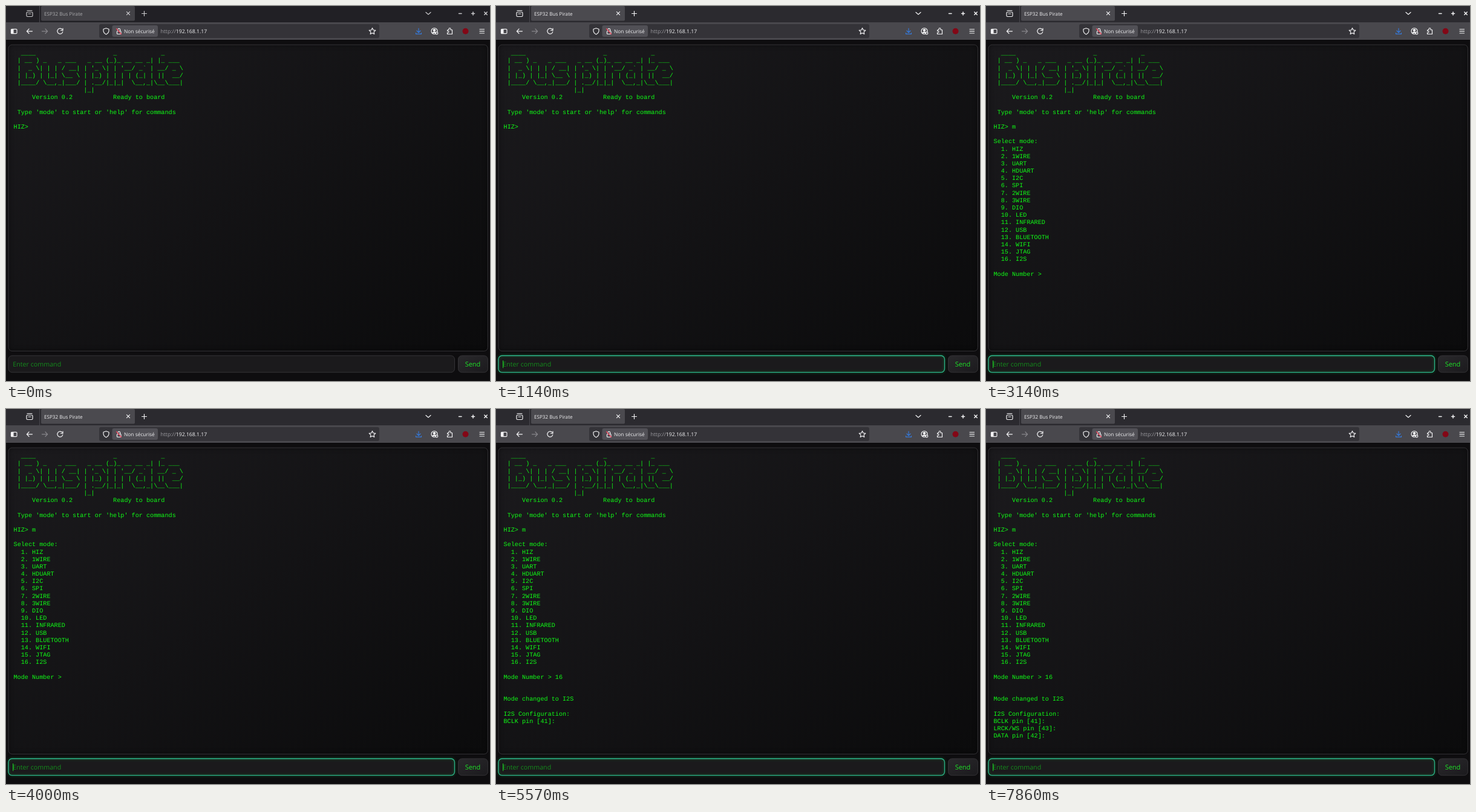
Animation, 800 px wide and 621 px high, one loop 8000 ms. Source, as an HTML page:

```html
<!DOCTYPE html>
<html lang="en">
<head>
<meta charset="utf-8">
<title>ESP32 Bus Pirate</title>
<style>
html, body { margin: 0; width: 100%; height: 100%; overflow: hidden; background: #0e0d0f; }
#panel {
  position: absolute; left: 4px; top: 64px; width: 792px; height: 507px; border-radius: 6px;
  background: linear-gradient(145deg, #1b1a1d, #0b0b0c);
  box-shadow: inset 0 0 8px #0007;
}
svg { position: absolute; left: 0; top: 0; }
text { font-family: "Open Sans", "Noto Sans", sans-serif; text-rendering: geometricPrecision; white-space: pre; }
#term text { font: 10.16px "Liberation Mono", monospace; fill: #10fc16; }
.ui { font-size: 8.15px; fill: #f0f0f2; }
.icon { fill: none; stroke: #f2f2f4; stroke-width: 1.2; stroke-linecap: round; stroke-linejoin: round; }
.frame { fill: none; stroke: #343336; }
.green { font-size: 11px; fill: #1fe428; }
#focus { fill: none; stroke: #2bb48a; stroke-width: 1.3; filter: drop-shadow(0 0 2px #14c84688); }
</style>
</head>
<body>
<div id="panel"></div>
<svg width="800" height="621" viewBox="0 0 800 621">
  <linearGradient id="button" x2="1" y2="1"><stop stop-color="#2a292c"/><stop offset="1" stop-color="#1b1a1d"/></linearGradient>

  <rect id="tabbar" width="800" height="28"/>
  <path d="M55.5 0V27" stroke="#48474d"/>
  <rect id="tab" x="58" y="0" width="155" height="24.5" rx="2"/>
  <rect y="27" width="800" height="29" fill="#49484d"/>
  <rect y="56" width="800" height="1" fill="#09080a"/>
  <rect x="154" y="30" width="463" height="23" rx="3" fill="#343338"/>
  <rect x="175.500" y="32" width="75.500" height="19" rx="3" fill="#515056"/>

  <g id="tabIcons" class="icon">
    <rect x="34" y="10" width="10" height="7.500" rx="1.500"/>
    <path d="M35 7.500H43M37 13H41"/>
    <path d="M199.500 9.700L204.500 14.700M204.500 9.700L199.500 14.700M224.500 12.500H232.500M228.500 8.500V16.500M694 10.500L698 14L702 10.500"/>
    <path d="M748.500 12.500H753M769.500 12.500H774.500M772 10V15M790.800 10L795.200 14.500M795.200 10L790.800 14.500" stroke-width="1.500"/>
  </g>
  <text id="tabTitle" class="ui" x="63" y="15.500">ESP32 Bus Pirate</text>

  <g class="icon">
    <rect x="8.500" y="38.300" width="9.500" height="7.400" rx="1.200"/>
    <path d="M9 39H12V45H9Z" fill="#f2f2f4"/>
    <path d="M43.500 41.800H34.500M38 38L34.300 41.800L38 45.500"/>
    <path d="M59.500 41.800H68.500M65 38L68.700 41.800L65 45.500" stroke="#88878c"/>
    <path d="M93 39A4.500 4.500 0 1 0 93.800 42.500M94 37V40.500H90.500"/>
    <path d="M165.500 36.800L170 38.300V41.500Q169.500 45 165.500 47Q161.500 45 161 41.500V38.300Z"/>
    <rect x="183.500" y="41.500" width="6.500" height="5" rx="1"/>
    <path d="M184.800 41V39A2 2 0 0 1 188.700 39V41"/>
    <path d="M182.500 37.500L190.500 46.500" stroke="#f04058"/>
    <path id="star"/>
    <path d="M682 37V43.500M679 41L682 44L685 41M677.500 44.500V46.300H686.500V44.500" stroke="#3578d8"/>
    <circle cx="708" cy="41.500" r="5"/>
    <circle cx="708" cy="40" r="1.700" fill="#f2f2f4"/>
    <path d="M705 44.500Q708 41.500 711 44.500Z" fill="#f2f2f4"/>
    <circle cx="712" cy="45" r="1.800" fill="#49484d"/>
    <path d="M730 39.500H732V38A1.500 1.500 0 0 1 735 38V39.500H737.500V46.500H729.500V44H731A1.300 1.300 0 0 0 731 41.500H729.500Z"/>
    <path d="M783 38.500H790.500M783 41.700H790.500M783 45H790.500"/>
  </g>
  <circle cx="759.500" cy="41.700" r="5" fill="#830716"/>
  <text class="ui" x="195" y="45" style="font-size:8.4px">Non sécurisé</text>
  <text class="ui" x="255.500" y="45" style="font-size:8.65px"><tspan fill="#9d9ca2">http://</tspan>192.168.1.17</text>

  <rect class="frame" x="4" y="64.200" width="792.300" height="507.200" rx="6"/>
  <!-- The slight turn keeps fractional baselines from snapping to whole pixels. -->
  <g id="term" transform="rotate(.01)"></g>

  <rect class="frame" x="4" y="579" width="737.500" height="27.700" rx="6" style="fill:#1b1a1c"/>
  <rect id="focus" x="4" y="579" width="737.500" height="27.700" rx="6"/>
  <rect class="frame" x="747.500" y="579" width="48.800" height="27.700" rx="6" style="fill:url(#button)"/>
  <text id="hint" class="green" x="11.300" y="597" style="font-size:10.7px;fill:#148c1c">Enter command</text>
  <text id="typed" class="green" x="11.500" y="597"></text>
  <rect id="caret" y="587" width="1" height="12.500" fill="#1fe428"/>
  <text class="green" x="771.500" y="597" text-anchor="middle">Send</text>
</svg>
<script>
const LOOP = 8000;
const $ = id => document.getElementById(id);

const banner = String.raw`
  ____                     _            _
 | __ ) _   _ ___   _ __ (_)_ __ __ _| |_ ___
 |  _ \| | | / __| | '_ \| | '__/ _${'`'} | __/ _ \
 | |_) | |_| \__ \ | |_) | | | | (_| | ||  __/
 |____/ \__,_|___/ | .__/|_|_|  \__,_|\__\___|
                   |_|
     Version 0.2           Ready to board

 Type 'mode' to start or 'help' for commands

HIZ>`.slice(1);
const modes = "HIZ 1WIRE UART HDUART I2C SPI 2WIRE 3WIRE DIO LED INFRARED USB BLUETOOTH WIFI JTAG I2S"
  .split(" ").map((name, i) => `  ${i + 1}. ${name}`).join("\n");

// Terminal output: [time, text appended]
const output = [
  [0, banner],
  [2290, " m"],
  [2710, `\n\nSelect mode:\n${modes}\n\nMode Number >`],
  [5290, " 16"],
  [5430, "\n\n\nMode changed to I2S\n\nI2S Configuration:\nBCLK pin [41]:"],
  [7000, "\nLRCK/WS pin [43]:"],
  [7570, "\nDATA pin [42]:"],
];
// Input field content and caret visibility: [time, value]
const input = [[0, ""], [1860, "m"], [2290, ""], [4570, "1"], [4710, "16"], [5290, ""]];
const blink = [[0, 0], [570, 1], [1290, 0], [1860, 1], [3290, 0], [3710, 1], [5860, 0], [6430, 1]];
const WINDOW_ACTIVE = 140, FIELD_FOCUS = 570, FOCUS_FADE = 300;

const valueAt = (track, t) => track.findLast(([start]) => t >= start)[1];

$("star").setAttribute("d", "M" + Array.from({ length: 10 }, (_, i) => {
  const r = i % 2 ? 2.7 : 5.6, a = i * Math.PI / 5;
  return `${605.5 + r * Math.sin(a)} ${42 - r * Math.cos(a)}`;
}).join("L") + "Z");

let shown = "";
function showTerminal(content) {
  if (content === shown) return;
  shown = content;
  $("term").replaceChildren(...content.split("\n").map((line, row) => {
    const text = document.createElementNS("http://www.w3.org/2000/svg", "text");
    text.setAttribute("x", 12.6);
    text.setAttribute("y", 81.2 + row * 12.18);
    text.textContent = line;
    return text;
  }));
}

function render(t) {
  const active = t >= WINDOW_ACTIVE;
  $("tabbar").style.fill = active ? "#2b2a2f" : "#212025";
  $("tab").style.fill = active ? "#4b4a4f" : "#434247";
  $("tabTitle").style.opacity = active ? 1 : 0.6;
  $("tabIcons").style.opacity = active ? 1 : 0.8;
  $("focus").style.opacity = Math.min(1, Math.max(0, (t - FIELD_FOCUS) / FOCUS_FADE));

  showTerminal(output.filter(([start]) => t >= start).map(([, text]) => text).join(""));

  const value = valueAt(input, t);
  $("typed").textContent = value;
  $("hint").style.opacity = value ? 0 : 1;
  $("caret").setAttribute("x", 11.2 + (value ? $("typed").getComputedTextLength() + 0.3 : 0));
  $("caret").style.opacity = valueAt(blink, t);
}

const begin = performance.now();
function tick() {
  render((performance.now() - begin) % LOOP);
  requestAnimationFrame(tick);
}
tick();
</script>
</body>
</html>
```
